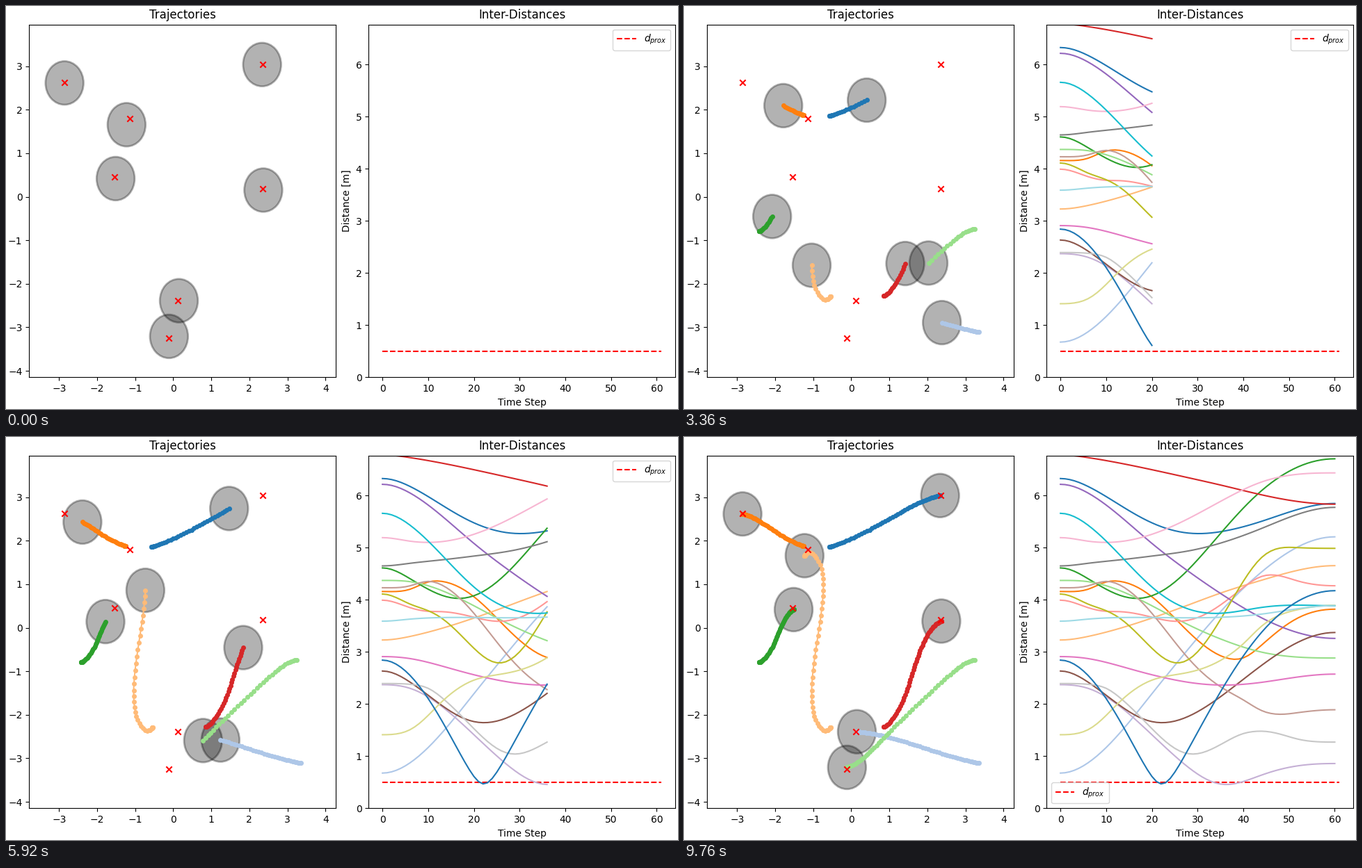
Recreate the animation shown at these times as a matplotlib script. Size 966x580 px, loop 9.92 s.

```python
from itertools import combinations

import matplotlib.pyplot as plt
import numpy as np
from matplotlib.animation import FuncAnimation
from matplotlib.patches import Circle

W, H, DPI = 966, 580, 100
STEPS = 61
RADIUS = 0.5
D_PROX = 0.5

KNOTS = (0, 6, 20, 28, 36, 44, 60)
LONG_KNOTS = (0, 6, 10, 13, 20, 28, 36, 40, 44, 48, 52, 60)

# Way points of each agent: x values, then y values.
PATHS = [
    ((-.574, -.442, .408, .956, 1.468, 1.90, 2.335),
     (1.858, 1.893, 2.219, 2.484, 2.739, 2.919, 3.037)),
    ((3.35, 3.216, 2.382, 1.808, 1.241, .718, .148),
     (-3.106, -3.085, -2.891, -2.728, -2.579, -2.46, -2.388)),
    ((-1.25, -1.313, -1.786, -2.097, -2.386, -2.62, -2.857),
     (1.874, 1.893, 2.093, 2.27, 2.428, 2.544, 2.614)),
    ((-.562, -.556, -.69, -.845, -1.04, -.903, -.733, -.775, -.967, -1.12, -1.195, -1.227),
     (-2.302, -2.308, -2.364, -2.263, -1.574, -.345, .86, 1.347, 1.658, 1.735, 1.69, 1.655)),
    ((-2.42, -2.378, -2.079, -1.931, -1.781, -1.634, -1.514),
     (-.792, -.776, -.453, -.142, .142, .337, .417)),
    ((3.24, 3.057, 2.031, 1.364, .784, .34, -.112),
     (-.736, -.787, -1.523, -2.081, -2.591, -2.974, -3.207)),
    ((.85, .949, 1.419, 1.629, 1.839, 2.07, 2.367),
     (-2.276, -2.228, -1.534, -.972, -.456, -.073, .153)),
]
GOALS = np.array([(2.358, 3.042), (.12, -2.385), (-2.852, 2.629), (-1.135, 1.794),
                  (-1.547, .453), (-.112, -3.25), (2.358, .19)])


def rest_spline(t, p, s):
    """Cubic spline through (t, p), at rest at both ends, sampled at s."""
    t, p = np.asarray(t, float), np.asarray(p, float)
    n, h = len(t), np.diff(t)
    d = np.diff(p) / h
    a, b = np.eye(n), np.zeros(n)
    for i in range(1, n - 1):
        a[i, i - 1:i + 2] = h[i], 2 * (h[i - 1] + h[i]), h[i - 1]
        b[i] = 3 * (h[i] * d[i - 1] + h[i - 1] * d[i])
    m = np.linalg.solve(a, b)
    k = np.clip(np.searchsorted(t, s, side="right") - 1, 0, n - 2)
    u = (s - t[k]) / h[k]
    return (p[k] + (p[k + 1] - p[k]) * u * u * (3 - 2 * u)
            + h[k] * u * (1 - u) * (m[k] * (1 - u) - m[k + 1] * u))


def track(path):
    knots = KNOTS if len(path[0]) == len(KNOTS) else LONG_KNOTS
    return np.column_stack([rest_spline(knots, c, steps) for c in path])


def panel(left, title, xlim, ylim):
    ax = fig.add_axes([left / W, 1 - 534.4 / H, 441 / W, 507.8 / H])
    ax.set(title=title, xlim=xlim, ylim=ylim)
    return ax


steps = np.arange(STEPS)
tracks = [track(p) for p in PATHS]
gaps = [np.hypot(*(a - b).T) for a, b in combinations(tracks, 2)]
colors = plt.get_cmap("tab20").colors

fig = plt.figure(figsize=(W / DPI, H / DPI), dpi=DPI)
ax_map = panel(33.2, "Trajectories", (-3.788, 4.274), (-4.148, 3.957))
ax_gap = panel(521.1, "Inter-Distances", (-3.05, 64.05), (0, 6.77))
ax_gap.set(xlabel="Time Step", ylabel="Distance [m]")

discs = [ax_map.add_patch(Circle(xy[-1], RADIUS, color="k", alpha=0.3, lw=2))
         for xy in tracks]
trails = [ax_map.plot([], [], "-o", ms=4, color=colors[i])[0]
          for i in range(len(tracks))]
ax_map.scatter(*GOALS.T, marker="x", color="red", zorder=3)

ax_gap.plot(np.arange(STEPS + 1), np.full(STEPS + 1, D_PROX), "r--", label="$d_{prox}$")
curves = [ax_gap.plot([], [], color=colors[i % 20])[0] for i in range(len(gaps))]
ax_gap.legend(loc="best")


def update(frame):
    # The first frame shows the goal state without any history.
    for xy, disc, trail in zip(tracks, discs, trails):
        disc.center = xy[frame - 1]
        trail.set_data(*xy[:frame].T)
    for gap, curve in zip(gaps, curves):
        curve.set_data(steps[:frame], gap[:frame])
    return discs + trails + curves


anim = FuncAnimation(fig, update, frames=STEPS + 1, init_func=lambda: update(0),
                     interval=160, repeat=True, blit=False)
plt.show()
```
